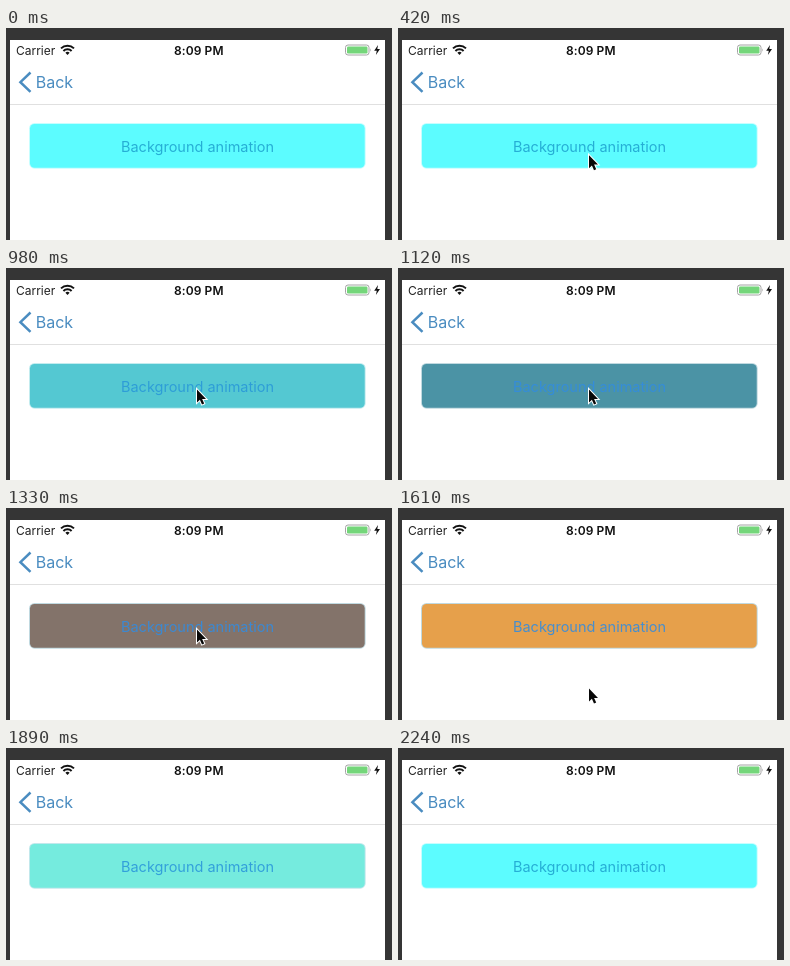
An HTML page for the animation above (2.8 s loop, 386 by 212 pixels).

```html
<!DOCTYPE html>
<html lang="en">
<head>
<meta charset="utf-8">
<title>Background animation</title>
<style>
  html, body { margin: 0; width: 100%; height: 100%; overflow: hidden; background: #353535; }
  svg { display: block; width: 386px; height: 212px; font-family: Inter, "Liberation Sans", sans-serif; }
</style>
</head>
<body>
<svg viewBox="0 0 386 212">
  <rect width="386" height="212" fill="#353535"/>
  <rect x="4" y="12" width="375" height="200" fill="#fff"/>
  <rect x="4" y="76" width="375" height="1" fill="#e0e0e0"/>

  <text x="10" y="26.5" font-size="12" fill="#222">Carrier</text>
  <g fill="none" stroke="#111" stroke-width="2">
    <path d="M55 20.4a9.3 9.3 0 0 1 13 0M57.4 23a5.9 5.9 0 0 1 8.2 0"/>
    <path d="M61.5 27l-2.1-2.3a3 3 0 0 1 4.2 0z" fill="#111" stroke="none"/>
  </g>
  <text x="192.8" y="26.5" font-size="12" font-weight="600" letter-spacing=".1" text-anchor="middle" fill="#111">8:09 PM</text>
  <rect x="339.5" y="17" width="23.5" height="10" rx="2.5" fill="#fff" stroke="#a4a4a4"/>
  <rect x="341" y="18.5" width="20.5" height="7" rx="1.2" fill="#74d67a"/>
  <path d="M364.3 20.2q1.6 1.8 0 3.6z" fill="#a4a4a4"/>
  <path d="M372 17l-3.8 5.7h2.6l-.9 4.3 4.1-5.9h-2.7z" fill="#111"/>

  <path d="M24.5 44.5L14.4 54.2l10.1 9.7" fill="none" stroke="#4a8cc0" stroke-width="2.5"/>
  <text x="29.7" y="60" font-size="16" fill="#4a8cc0">Back</text>

  <rect id="button" x="24" y="96" width="334.7" height="43.7" rx="4.5" stroke-width="2" stroke-opacity=".35" paint-order="stroke"/>
  <text id="label" x="191.5" y="123.6" font-size="14.5" text-anchor="middle" opacity=".88">Background animation</text>

  <circle id="ring" cx="190.5" cy="122.6" r="21.3" fill="none" stroke="#16282c" stroke-width="1.6"/>
  <path id="cursor" d="M0 0V13L2.9 10.3L5 15L7.2 14L5.1 9.4H9Z" fill="#080808" stroke="#fff" stroke-width="2" paint-order="stroke"/>
</svg>
<script>
const LOOP = 2800, STEP = 70;
const PRESS = 840, SLATE = 1120, BROWN = 1330, ORANGE = 1610, END = 2100;
const cyan = [92, 252, 255], slate = [75, 147, 165], brown = [131, 115, 106], orange = [230, 160, 75];
const restText = [31, 164, 208], tint = [50, 140, 224];

const $ = id => document.getElementById(id);
const clamp = v => Math.min(1, Math.max(0, v));
const progress = (t, from, to) => clamp((t - from) / (to - from));
const easeOut = p => 1 - (1 - p) ** 2;
const mix = (a, b, p) => a.map((v, i) => v + (b[i] - v) * p);
const paint = (id, attr, c) => $(id).setAttribute(attr, `rgb(${c.map(Math.round)})`);
const show = (id, on) => $(id).style.display = on ? "" : "none";

function buttonColour(t) {
  if (t < SLATE) return mix(cyan, slate, progress(t, PRESS, SLATE));
  if (t < BROWN) return mix(slate, brown, progress(t, SLATE, BROWN));
  if (t < ORANGE) return mix(brown, orange, progress(t, BROWN, ORANGE));
  return mix(orange, cyan, easeOut(progress(t, ORANGE, END)));
}

// glides in from below, rests on the button, then leaves
function cursorY(t) {
  const away = 1 - easeOut(progress(t, 0, 560));
  const leave = Math.max(0, t - BROWN) / (ORANGE - BROWN);
  return 121.5 + 90 * away + 59 * leave ** 1.5;
}

function draw(now) {
  const t = Math.floor(now % LOOP / STEP) * STEP;
  const active = progress(t, PRESS, SLATE) * (1 - progress(t, 1750, END));
  paint("button", "fill", buttonColour(t));
  paint("button", "stroke", mix(cyan, slate, active));
  paint("label", "fill", mix(restText, tint, active));
  show("ring", t >= 630 && t < 910);
  show("cursor", t > 0 && t < 1750);
  $("cursor").setAttribute("transform", `translate(191 ${cursorY(t)})`);
}

const start = performance.now();
function tick() {
  draw(performance.now() - start);
  requestAnimationFrame(tick);
}
tick();
</script>
</body>
</html>
```
